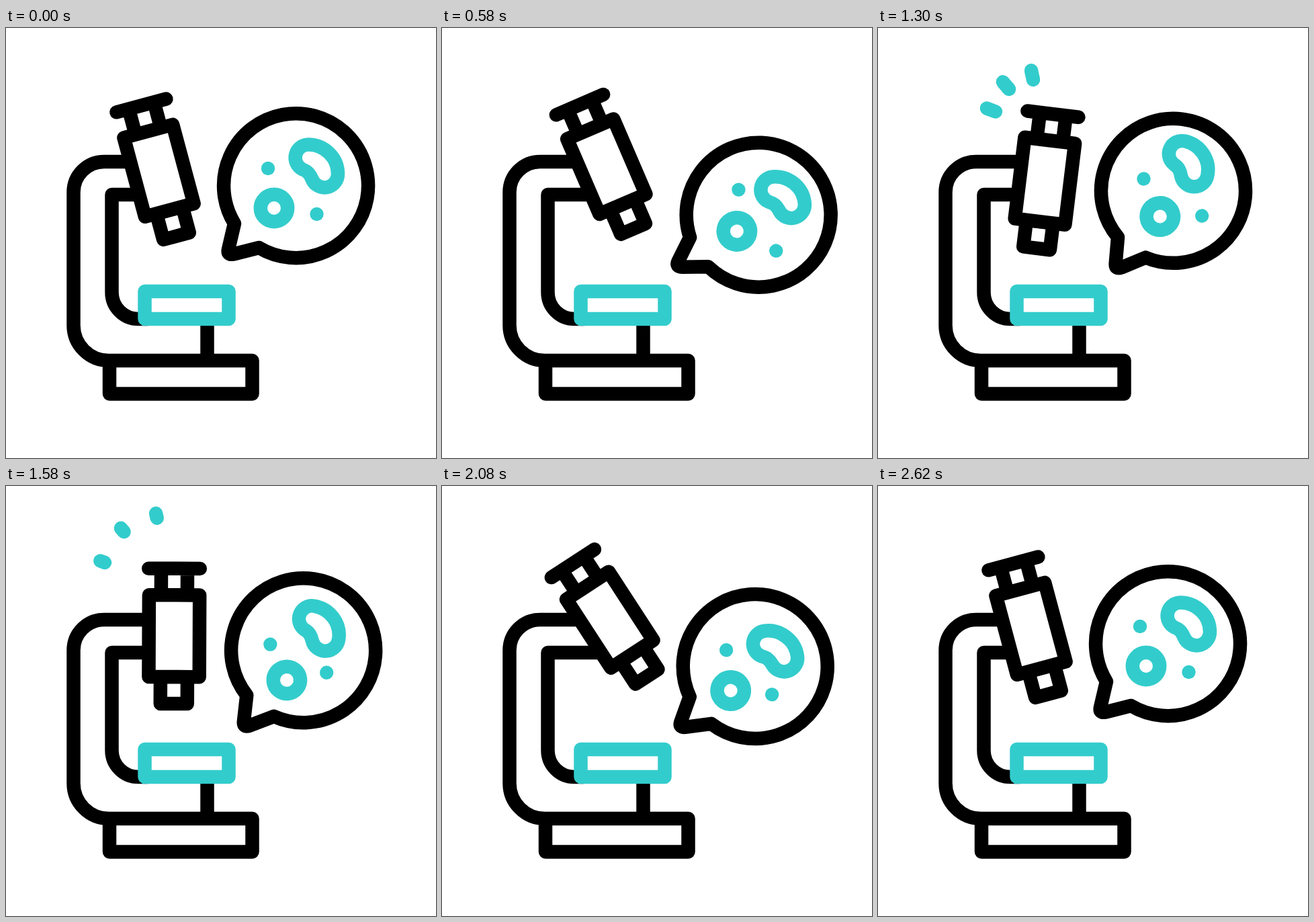
Recreate the animation shown at these times as an HTML page without scripts. Size 640x640 px, loop 3 s.

```html
<!DOCTYPE html>
<html lang="en">
<head>
<meta charset="utf-8">
<title>Microscope</title>
<style>
html, body { margin: 0; width: 100%; height: 100%; overflow: hidden; background: #fff; }
svg {
  display: block; width: 100%; height: 100%;
  fill: none; stroke: #000; stroke-width: 20.5; stroke-linecap: round; stroke-linejoin: round;
}
.teal { stroke: #3cc; }
.dot { fill: #3cc; stroke: none; }
.solid { fill: #fff; }
.butt { stroke-linecap: butt; }

.slide, .swing, .drift, .spark {
  animation: 3s cubic-bezier(.33, 0, .67, 1) infinite;
}
.slide { animation-name: slide; }
.swing { animation-name: swing; }
.drift { animation-name: drift; }
.spark { animation-name: spark; animation-timing-function: linear; }

.tube { --rest: -15deg; --back: -27deg; --hit: 9.7deg; --recoil: -34deg; }
.bubble { --rest: 0deg; --back: 19.3deg; --hit: -10.5deg; --recoil: 7deg; transform-origin: 329.5px 336px; }
.bean { --rest: 0deg; --back: -26.5deg; --hit: 24deg; --recoil: -14.5deg; transform-origin: 462px 205.5px; }
.bubble-slide { animation-name: bubble-slide; }
.bean-drift { animation-name: bean-drift; }

/* Shared rhythm: lean back, strike, recoil, settle */
@keyframes swing {
  0%, 6.8%, 86.8%, 100% { rotate: var(--rest); }
  26.7% { rotate: var(--back); }
  46.7% { rotate: var(--hit); }
  66.7% { rotate: var(--recoil); }
}
@keyframes slide {
  0%, 6.8%, 86.8%, 100% { translate: 0 0; }
  26.7%, 66.2% { translate: 25px 0; }
}
@keyframes bubble-slide {
  0%, 6.8%, 87%, 100% { translate: 0 0; }
  24.3%, 69.3% { translate: 23.6px 21.3px; }
}
@keyframes drift {
  0%, 6.8%, 86.8%, 100% { translate: 0 0; }
  30% { translate: var(--out); }
  60.67% { translate: var(--in); }
  77% { translate: var(--late, 0 0); }
}
@keyframes bean-drift {
  0%, 6.8%, 86.8%, 100% { translate: 0 0; }
  30%, 43.3% { translate: -3px -7.5px; }
  60.67% { translate: -5px 4.6px; }
}
@keyframes spark {
  0%, 39.3% { visibility: hidden; stroke-dasharray: 0 200; stroke-dashoffset: 0; }
  39.4% { visibility: visible; stroke-dasharray: 0 200; stroke-dashoffset: 0; }
  43.6% { visibility: visible; stroke-dasharray: 40 200; stroke-dashoffset: 0; }
  49% { visibility: visible; stroke-dasharray: 60 200; stroke-dashoffset: -40; }
  54.4% { visibility: visible; stroke-dasharray: 0 200; stroke-dashoffset: -100; }
  54.5%, 100% { visibility: hidden; stroke-dasharray: 0 200; stroke-dashoffset: -100; }
}
</style>
</head>
<body>
<svg viewBox="0 0 640 640">
  <!-- stand -->
  <path d="M235 199H146A45.5 45.5 0 0 0 100.5 244.5V442.5A52.5 52.5 0 0 0 153 495"/>
  <path d="M245 248H157.5V393.5A39.5 39.5 0 0 0 197 433H210"/>
  <path class="butt" d="M299.500 433V495"/>
  <rect x="154" y="495" width="212.5" height="49.5"/>
  <rect class="teal solid" x="206.5" y="392" width="125" height="41"/>

  <!-- tube, drawn upright around its hinge -->
  <g class="slide">
    <g transform="translate(185.7 209.4)">
      <g class="tube swing">
        <path d="M1.2 -86.7H77.8M20 -86.7V-47.2M59 -86.7V-47.2"/>
        <rect x="19.5" y="74.5" width="40" height="40"/>
        <rect class="solid" x="2" y="-47.2" width="75.3" height="121.7"/>
      </g>
    </g>
  </g>

  <g class="teal">
    <path class="spark" pathLength="100" d="M175 124.5L140.4 111.5"/>
    <path class="spark" pathLength="100" d="M195 91L171 62.8"/>
    <path class="spark" pathLength="100" d="M231 77L223.2 40.8"/>
  </g>

  <!-- speech bubble with cells -->
  <g class="slide bubble-slide">
    <g class="bubble swing">
      <path d="M340 291A107.5 107.5 0 1 1 376.5 327L339 336.500Q329 338.5 331 329.5Z"/>
      <circle class="dot drift" style="--out: 7px -7px; --in: -9px 14.5px" cx="390" cy="209" r="10.2"/>
      <circle class="dot drift" style="--out: 12px 6.5px; --in: -3px -8px" cx="462.5" cy="277" r="10.2"/>
      <circle class="teal drift" style="--out: 12px -4px; --in: 1px 10px; --late: 0 4px" cx="399" cy="268" r="20.2"/>
      <g class="drift bean-drift">
        <path class="teal bean swing" d="M441.5 210.5A19.5 19.5 0 0 1 450 173.5C474 173.5 494 193 494 217A20 20 0 0 1 455.5 225C452.5 218 449.5 213.5 441.5 210.5Z"/>
      </g>
    </g>
  </g>
</svg>
</body>
</html>
```
